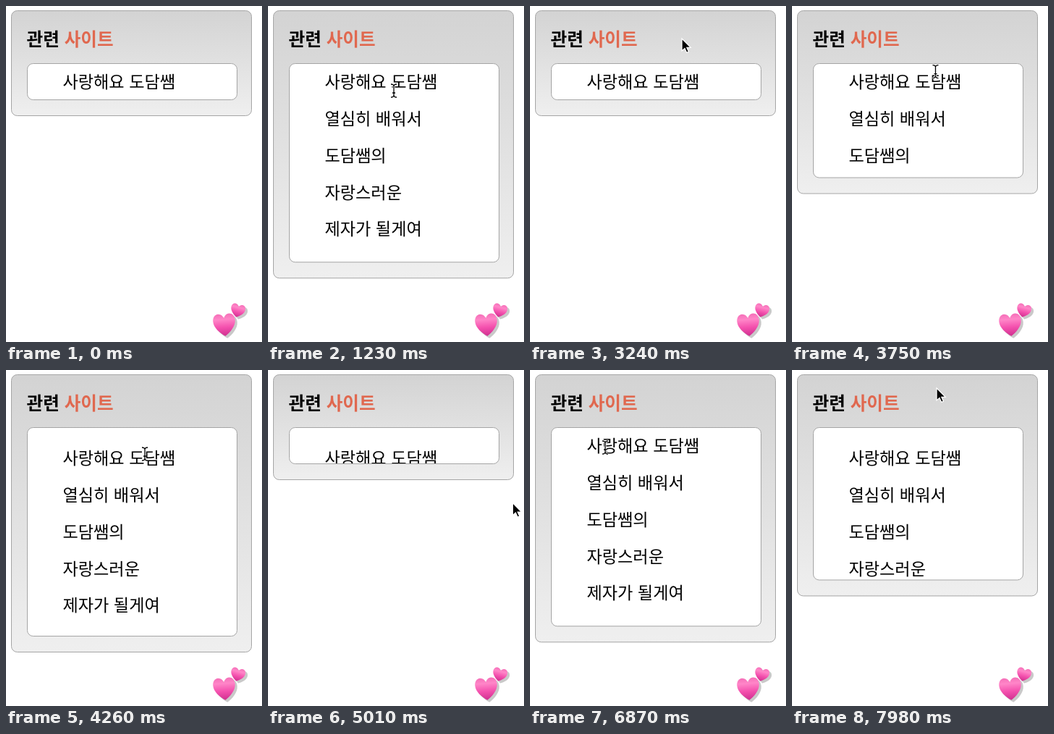
These frames come from a looping animation (354x464 px, 8000 ms). An HTML page:

```html
<!DOCTYPE html>
<html lang="ko">
<head>
<meta charset="utf-8">
<style>
  html, body { margin: 0; width: 100%; height: 100%; overflow: hidden; background: #fff; }
  svg { display: block; width: 354px; height: 464px; }
  text { font-family: "Noto Sans CJK KR", "Noto Sans CJK", "Noto Sans CJK JP", sans-serif; white-space: pre; }
</style>
</head>
<body>
<svg viewBox="0 0 354 464">
  <defs>
    <linearGradient id="gray" x2="0" y2="1">
      <stop stop-color="#d3d3d3"/><stop offset="1" stop-color="#efefef"/>
    </linearGradient>
    <linearGradient id="pink" x2="0" y2="1">
      <stop stop-color="#f56fb8"/><stop offset=".25" stop-color="#ff86c8"/>
      <stop offset=".6" stop-color="#f451ae"/><stop offset="1" stop-color="#cf2f8f"/>
    </linearGradient>
    <path id="heart" d="M0 .9C-.45 .65-1 .2-1-.3-1-.65-.77-.85-.5-.85-.25-.85-.08-.7 0-.5 .08-.7 .25-.85 .5-.85 .77-.85 1-.65 1-.3 1 .2 .45 .65 0 .9Z"/>
    <g id="pair">
      <use href="#heart" transform="translate(302 440) rotate(-5) scale(15.3 17.6)"/>
      <use href="#heart" transform="translate(320.5 420.5) rotate(14) scale(10 10.4)"/>
    </g>
    <clipPath id="clip"><rect id="hole" x="30" y="80" width="289" height="49" rx="7"/></clipPath>
  </defs>

  <rect id="card" x="7.5" y="6.5" width="332" height="145" rx="8" fill="url(#gray)" stroke="#a5a5a5"/>
  <text x="28.5" y="54.7" font-size="24.6" font-weight="700">관련 <tspan fill="#e0684f">사이트</tspan></text>
  <rect id="box" x="29.5" y="79.5" width="290" height="50" rx="8" fill="#fff" stroke="#a5a5a5"/>
  <g clip-path="url(#clip)"><g id="list" font-size="23.15"></g></g>

  <use href="#pair" x="3" y="3" fill="#c9c9c9"/>
  <g fill="url(#pink)"><use href="#pair"/></g>

  <path id="arrow" d="M0 0V17L4 13.4 6.7 19.4 9.4 18.2 6.8 12.4H12.2Z" stroke="#fff" stroke-width="1.2"/>
  <g id="beam" fill="none">
    <path id="bar" d="M-4-9Q0-9 0-6Q0-9 4-9M0-7V7M-4 9Q0 9 0 6Q0 9 4 9M-2 3H2" stroke="#fff" stroke-width="3"/>
    <use href="#bar" style="display:none"/>
    <path d="M-4-9Q0-9 0-6Q0-9 4-9M0-7V7M-4 9Q0 9 0 6Q0 9 4 9M-2 3H2" stroke="#000" stroke-width="1.3"/>
  </g>
</svg>
<script>
const LOOP = 8000, FADE = 300;
const $ = id => document.getElementById(id);
const rows = ["사랑해요 도담쌤", "열심히 배워서", "도담쌤의", "자랑스러운", "제자가 될게여"];
$("list").innerHTML = rows.map((s, i) => `<text x="78.5" y="${113.3 + i * 50.75}">${s}</text>`).join("");

// Alternating moments when the pointer enters and leaves the box
const toggles = [1020, 2300, 3670, 4700, 6660, 7917];

// Pointer moves: start time, end time, destination
const moves = [
  [140, 1230, 174, 117], [2100, 2740, 210, 45], [3410, 4260, 192, 116], [4530, 4820, 345, 180],
  [5000, 5780, 109, 311], [6245, 6870, 104, 107], [6960, 7400, 190, 150], [7870, 7980, 200, 25]
];

const bez = (u, a, b) => 3 * u * (1 - u) ** 2 * a + 3 * u * u * (1 - u) * b + u ** 3;

// CSS "ease" curve
function ease(x) {
  if (x >= 1) return 1;
  let lo = 0, hi = 1;
  for (let i = 0; i < 20; i++) {
    const mid = (lo + hi) / 2;
    if (bez(mid, .25, .25) < x) lo = mid; else hi = mid;
  }
  return bez(lo, .1, 1);
}

// How far open (0..1) a property is, with its transition delay
function level(t, delay) {
  const i = toggles.findLastIndex(s => s + delay <= t);
  if (i < 0) return 0;
  const p = ease((t - toggles[i] - delay) / FADE);
  return i % 2 ? 1 - p : p;
}

// Each move slows down towards its destination
function pointer(t) {
  let x = 215, y = 466;
  for (const [from, to, toX, toY] of moves) {
    if (t < from) break;
    const k = 1 - (1 - Math.min(1, (t - from) / (to - from))) ** 2;
    x += (toX - x) * k;
    y += (toY - y) * k;
  }
  return [x, y];
}

function draw(t) {
  const h = 50 + 238 * level(t, 0);
  $("box").setAttribute("height", h);
  $("card").setAttribute("height", h + 95);
  $("hole").setAttribute("height", h - 1);
  $("list").setAttribute("transform", `translate(0 ${17 * level(t, FADE)})`);

  const [x, y] = pointer(t);
  const overText = x > 79 && x < 233 && y > 80 && y < 79 + h;
  $("arrow").style.display = overText ? "none" : "";
  $("beam").style.display = overText ? "" : "none";
  for (const id of ["arrow", "beam"]) $(id).setAttribute("transform", `translate(${x} ${y})`);
}

const start = performance.now();
function tick() {
  draw((performance.now() - start) % LOOP);
  requestAnimationFrame(tick);
}
tick();
</script>
</body>
</html>
```
